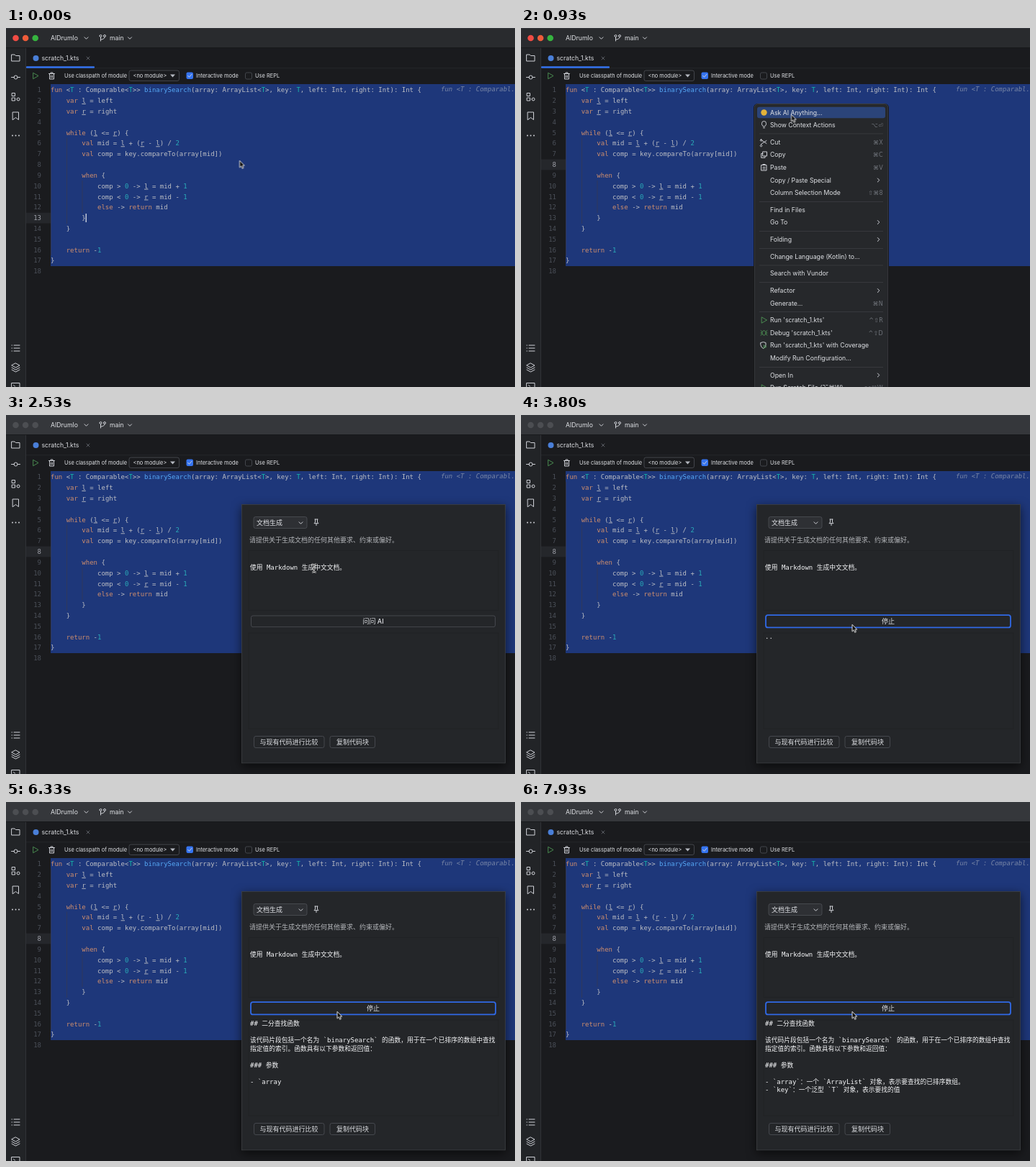
These frames come from a looping animation (707 px wide and 499 px high, 8000 ms). An HTML page:

```html
<!DOCTYPE html>
<html lang="zh-CN">
<head>
<meta charset="utf-8">
<title>Editor assistant</title>
<style>
html, body { margin: 0; width: 100%; height: 100%; overflow: hidden; background: #1a1b1e; }
svg { display: block; width: 100vw; height: 100vh; }
text { white-space: pre; fill: #dfe1e5; font: 8.7px Inter, "Noto Sans CJK SC", "Noto Sans CJK", sans-serif; }
.small { font-size: 7.45px; }
.zh { font: 500 9px Inter, "Noto Sans CJK SC", "Noto Sans CJK", sans-serif; }
.mono { font: 9px "DejaVu Sans Mono", "Noto Sans CJK SC", "Noto Sans CJK", monospace; }
.reply { fill: #f6f7f9; }
.wide { font: 500 8.75px "Noto Sans CJK SC", "Noto Sans CJK", sans-serif; }
.code { fill: #bcbec4; }
.num { fill: #4b5059; text-anchor: end; }
.lit { fill: #a1a3ab; }
.key { fill: #cf8e6d; }
.fn { fill: #56a8f5; }
.type { fill: #16baac; }
.digit { fill: #2aacb8; }
.mut { text-decoration: underline; }
.hint { fill: #7886a6; font-style: italic; }
.short { fill: #6f737a; font: 8px "DejaVu Sans", sans-serif; text-anchor: end; letter-spacing: .3px; }
.mid { text-anchor: middle; }
.label { fill: #b4b6ba; font-weight: 400; }
.icon { fill: none; stroke: #ced0d6; stroke-width: 1; stroke-linecap: round; stroke-linejoin: round; }
.green { stroke: #4f9655; stroke-width: .9; }
.dim { stroke: #6f737a; stroke-width: .8; }
.box { fill: none; stroke: #4e5157; stroke-width: .8; }
.combo { fill: #2e3034; stroke: #4e5157; stroke-width: .8; }
.ring { fill: #242629; stroke: #3069e6; stroke-width: 1.8; }
.pane { fill: none; stroke: #202225; }
.panel { fill: #242629; stroke: #3e4044; stroke-width: .8; filter: drop-shadow(0 4px 7px #0009); }

.before, .menu, .after, .active, .dialog, .pick, .ask, .stop, .draft, .final, .arrow, .beam, .pointer {
  animation: 8s step-end infinite;
}
.before { animation-name: before; }
.menu { animation-name: menu; }
.after { animation-name: after; }
.active { animation-name: active; }
.dialog { animation-name: dialog; }
.pick { animation-name: pick; }
.ask { animation-name: ask; }
.stop { animation-name: stop; }
.draft { animation-name: draft; }
.final { animation-name: final; }
.arrow { animation-name: arrow; }
.beam { animation-name: beam; }
.pointer { animation-name: move; animation-timing-function: ease-in-out; }
@keyframes before { 0% { opacity: 1 } 2.5%, to { opacity: 0 } }
@keyframes menu { 0% { opacity: 0 } 2.5% { opacity: 1 } 11.8%, to { opacity: 0 } }
@keyframes after { 0% { opacity: 0 } 2.5%, to { opacity: 1 } }
@keyframes active { 0% { opacity: 1 } 12%, to { opacity: 0 } }
@keyframes dialog { 0% { opacity: 0 } 12%, to { opacity: 1 } }
@keyframes pick { 0% { opacity: 1 } 24.5%, to { opacity: 0 } }
@keyframes ask { 0% { opacity: 1 } 42%, to { opacity: 0 } }
@keyframes stop { 0% { opacity: 0 } 42%, to { opacity: 1 } }
@keyframes draft { 0% { opacity: 1 } 31%, to { opacity: 0 } }
@keyframes final { 0% { opacity: 0 } 31%, to { opacity: 1 } }
@keyframes arrow { 0% { opacity: 1 } 15.6% { opacity: 0 } 37.5%, to { opacity: 1 } }
@keyframes beam { 0% { opacity: 0 } 15.6% { opacity: 1 } 37.5%, to { opacity: 0 } }
@keyframes move {
  0%, 3% { transform: translate(324.5px, 184.3px) }
  6.2%, 12.5% { transform: translate(375.5px, 120.3px) }
  18%, 22% { transform: translate(426px, 230px) }
  24.2%, 34% { transform: translate(428px, 213px) }
  41%, to { transform: translate(460px, 291.2px) }
}
</style>
</head>
<body>
<svg id="stage" viewBox="0 0 707 499" preserveAspectRatio="none"></svg>
<script>
const stage = document.getElementById('stage');
const LOOP = 8000, ROW = 14.83;

const text = (x, y, content, cls = '') => `<text x="${x}" y="${y}" class="${cls}">${content}</text>`;
const rect = (x, y, w, h, fill, r = 0) => `<rect x="${x}" y="${y}" width="${w}" height="${h}" rx="${r}" fill="${fill}"/>`;
const frame = (x, y, w, h, cls = 'box', r = 2.5) => `<rect x="${x}" y="${y}" width="${w}" height="${h}" rx="${r}" class="${cls}"/>`;
const dot = (x, y, r, fill) => `<circle cx="${x}" cy="${y}" r="${r}" fill="${fill}"/>`;
const icon = (x, y, d, cls = '') => `<path transform="translate(${x} ${y})" d="${d}" class="icon ${cls}"/>`;
const group = (cls, ...parts) => `<g class="${cls}">${parts.join('')}</g>`;
const lights = colors => colors.map((c, i) => dot(13.5 + i * 13.6, 14, 4.3, c)).join('');
const escape = s => s.replace(/&/g, '&amp;').replace(/</g, '&lt;').replace(/>/g, '&gt;');
const mixed = s => escape(s).replace(/[^\x00-\x7f]+/g, run => `<tspan class="wide">${run}</tspan>`);

const DOWN = 'M-2.5-1.2L0 1.3L2.5-1.2', RIGHT = 'M-1.2-2.5L1.3 0L-1.2 2.5';
const PLAY = 'M-3-4L4 0L-3 4Z';

const code = `fun <T : Comparable<T>> binarySearch(array: ArrayList<T>, key: T, left: Int, right: Int): Int {
    var l = left
    var r = right

    while (l <= r) {
        val mid = l + (r - l) / 2
        val comp = key.compareTo(array[mid])

        when {
            comp > 0 -> l = mid + 1
            comp < 0 -> r = mid - 1
            else -> return mid
        }
    }

    return -1
}
`.split('\n');

const tokens = [
  ['key', /^(fun|var|val|while|when|else|return)$/],
  ['fn', /^binarySearch$/], ['type', /^T$/], ['mut', /^[lr]$/], ['digit', /^\d+$/]
];
const highlight = line => escape(line).replace(/\w+/g, word => {
  const hit = tokens.find(([, rule]) => rule.test(word));
  return hit ? `<tspan class="${hit[0]}">${word}</tspan>` : word;
});

const baseline = n => 89.2 + (n - 1) * ROW;
const currentLine = (n, cls) => group(cls,
  rect(28, baseline(n) - 10.5, 34, ROW, '#25272b'), text(49, baseline(n), n, 'mono num lit'));

function chrome() {
  return [
    rect(0, 0, 707, 499, '#1a1b1e'),
    rect(0, 0, 707, 27, '#35373b'), lights(Array(3).fill('#4c4e52')),
    group('active', rect(0, 0, 707, 27, '#292b2e'), lights(['#f04c44', '#ee5c3a', '#36b43f'])),
    rect(0, 0, 707, .8, '#3a3d42'),
    rect(0, 27, 27, 472, '#222427'), rect(27, 27, 1, 472, '#303236'), rect(0, 27, 707, .8, '#17181a'),
    text(62, 17, 'AIDrumlo'), icon(111.5, 14, DOWN),
    icon(134, 14, 'M-2.5-1.5V4M-2.5 2Q3 2 3-1.5M-4-3A1.5 1.5 0 1 0-1-3A1.5 1.5 0 1 0-4-3M1.5-3A1.5 1.5 0 1 0 4.5-3A1.5 1.5 0 1 0 1.5-3'),
    text(144, 17, 'main'), icon(172, 14, DOWN),
    icon(13.5, 41.5, 'M-5.5-4.5H-1.5L0-3H5.5V4.5H-5.5Z'),
    icon(13.5, 68.5, 'M-6 0H-2.5M2.5 0H6M-2.5 0A2.5 2.5 0 1 0 2.5 0A2.5 2.5 0 1 0-2.5 0'),
    icon(13.5, 95.5, 'M-5-5H-1V-1H-5ZM-5 1.5H-1V5.5H-5ZM1.5 3.5A2 2 0 1 0 5.5 3.5A2 2 0 1 0 1.5 3.5'),
    icon(13.5, 122.5, 'M-4-5.5H4V5L0 2L-4 5Z'),
    [-4.5, 0, 4.5].map(dx => dot(13.5 + dx, 149.5, 1, '#ced0d6')).join(''),
    icon(13.5, 445, 'M-2.5-4H5.5M-2.5 0H5.5M-2.5 4H5.5M-5.5-4H-5M-5.5 0H-5M-5.5 4H-5'),
    icon(13.5, 472, 'M0-6L5.5-3L0 0L-5.5-3ZM-5.5 0L0 3L5.5 0M-5.5 3L0 6L5.5 3'),
    icon(13.5, 498, 'M-5.5-4.5H5.5V5H-5.5ZM-3-1.5L-1 0'),
    dot(41.5, 42, 4, '#4a7fd8'), text(49.5, 45.2, 'scratch_1.kts'),
    icon(114, 42, 'M-2-2L2 2M2-2L-2 2', 'dim'),
    rect(28, 55.5, 679, .7, '#2b2d31'),
    group('active', rect(28, 53.3, 95, 2.4, '#3574f0', 1)),
    icon(41, 66.5, PLAY, 'green'),
    icon(63.5, 66.5, 'M-4-3H4M-1.5-3V-4.5H1.5V-3M-3-3V4.5H3V-3M-1-.5V2.5M1-.5V2.5'),
    text(81, 69.2, 'Use classpath of module', 'small'),
    frame(171, 59, 69.5, 14.5), text(176.5, 69.2, '&lt;no module&gt;', 'small'),
    '<path d="M228 64.5h7l-3.5 4z" fill="#b4b8bf"/>',
    rect(250.5, 61.5, 9.5, 9.5, '#3574f0', 2), icon(255.2, 66.3, 'M-2.5 0L-.7 2L2.7-2'),
    text(264, 69.2, 'Interactive mode', 'small'),
    frame(332.5, 62, 9, 9, 'box', 2), text(346, 69.2, 'Use REPL', 'small')
  ].join('');
}

function editor() {
  const numbers = code.map((_, i) => text(49, baseline(i + 1), i + 1, 'mono num')).join('');
  const lines = code.map((line, i) => text(62, baseline(i + 1), highlight(line), 'mono code')).join('');
  return [
    rect(62, 78, 645, 253, '#1e377a'), numbers,
    '<path d="M62.5 93V316M84.5 152.5V272M106 212V257" stroke="#31395a" stroke-width=".9"/>',
    currentLine(13, 'before'), currentLine(8, 'after'),
    lines, text(604, 87.5, escape('fun <T : Comparabl...'), 'mono hint'),
    group('before', rect(110.6, 258, 1.2, 12, '#e8eaee'))
  ].join('');
}

function menu() {
  const items = [
    [117.5, 'Ask AI Anything…'], [135, 'Show Context Actions', '⌥⏎'],
    [158.5, 'Cut', '⌘X'], [176, 'Copy', '⌘C'], [194, 'Paste', '⌘V'],
    [211.5, 'Copy / Paste Special', '>'], [229, 'Column Selection Mode', '⇧⌘8'],
    [252.5, 'Find in Files'], [270, 'Go To', '>'], [294, 'Folding', '>'],
    [317.5, 'Change Language (Kotlin) to…'], [341, 'Search with Vundor'],
    [365, 'Refactor', '>'], [382.5, 'Generate…', '⌘N'],
    [406, "Run 'scratch_1.kts'", '^⇧R'], [423.5, "Debug 'scratch_1.kts'", '^⇧D'],
    [441, "Run 'scratch_1.kts' with Coverage"], [459, 'Modify Run Configuration…'],
    [482.5, 'Open In', '>'], [500, 'Run Scratch File (⌥⌘W)', '⌥⌘W']
  ];
  const rows = items.map(([y, name, extra]) => text(346, y + 3.1, name) +
    (extra === '>' ? icon(496.5, y, RIGHT) : extra ? text(503, y + 3, extra, 'short') : '')).join('');
  const rules = [146.5, 241, 282, 306, 329.5, 353, 394, 471].map(y => rect(331, y, 172, .8, '#3b3d41')).join('');
  return group('menu',
    rect(323, 105, 188, 400, '#111214', 6),
    '<rect x="324.3" y="105.5" width="185.4" height="400" rx="5" fill="#26282b" stroke="#43454a" stroke-width=".8"/>',
    rect(328, 109.7, 178, 15.6, '#2b4479', 3), rules, rows,
    dot(337.5, 117.5, 4.2, '#e3b23a'),
    icon(337.5, 134.5, 'M-1.5 2Q-3.5 0-3-2A3 3 0 0 1 3-2Q3.5 0 1.5 2ZM-1 4.3H1'),
    icon(337.5, 158.5, 'M-4-3L3.5 2M-4 3L3.5-2M-4-3.8A1.3 1.3 0 1 0-3.9-3.8M-4 3.8A1.3 1.3 0 1 0-3.9 3.8'),
    icon(337.5, 176, 'M-1.5-4H4V2H-1.5ZM-1.5-1.5H-3.8V4.3H1.5V2'),
    icon(337.5, 194, 'M-3.5-3.5H3.5V4H-3.5ZM-1.5-4.5H1.5M-1.5-.5H1.5M-1.5 1.8H1.5'),
    icon(337.5, 406, PLAY, 'green'),
    icon(337.5, 423.5, 'M-2.5-1Q0-5 2.5-1V1.5Q0 6 -2.5 1.5ZM-4.5-3L-2.5-1.2M4.5-3L2.5-1.2M-4.5 3.5L-2.5 2M4.5 3.5L2.5 2M-4.5 .4H-2.5M2.5 .4H4.5', 'green'),
    icon(336.5, 441, 'M-3.5-3.5L0-4.5L3.5-3.5V0Q3 3 0 4.5Q-3 3-3.5 0Z'), icon(339, 443, 'M-1.5-2L2 0L-1.5 2Z', 'green'),
    icon(337.5, 500, PLAY, 'green'));
}

function dialog() {
  const prompt = (s, cls) => group(cls, text(339, 215.2, mixed(s), 'mono reply'));
  const output = Array.from({ length: 9 }, (_, i) => text(339, 311.2 + i * 11.53, '', 'mono reply line')).join('');
  return group('dialog',
    frame(327.4, 124.4, 366, 359.4, 'panel', 0),
    frame(337, 188.5, 347, 83, 'pane', 0), frame(337, 303, 347, 133, 'pane', 0),
    frame(344, 141.5, 74, 16, 'combo'), group('pick', frame(343.2, 140.9, 75.4, 17.2, 'ring', 3)),
    text(348, 153, '文档生成', 'zh'), icon(409.5, 150, DOWN),
    icon(431, 149, 'M-2-4H2M-1.5-4V0L-3 1.7H3L1.5 0V-4M0 1.7V4.5'),
    text(338, 177.3, '请提供关于生成文档的任何其他要求、约束或偏好。', 'zh label'),
    prompt('使用 Markdown 生成文档。', 'draft'), prompt('使用 Markdown 生成中文文档。', 'final'),
    group('ask', frame(340.5, 279, 339, 15.6), text(510, 290.2, '问问 AI', 'zh mid')),
    group('stop', frame(340, 278.2, 340, 17.2, 'ring', 3), text(510, 290.2, '停止', 'zh mid')),
    output,
    frame(344.5, 446.5, 97.5, 16), text(393, 457.7, '与现有代码进行比较', 'zh mid'),
    frame(450, 446.5, 62.5, 16), text(481.5, 457.7, '复制代码块', 'zh mid'));
}

const BEAM = 'M-3-5.5Q0-5.5 0-4Q0-5.5 3-5.5M0-4V4M-3 5.5Q0 5.5 0 4Q0 5.5 3 5.5M-1.5 1H1.5';
const pointer = group('pointer',
  '<path class="arrow" d="M0 0V9.6L2.2 7.6L3.7 11L5.4 10.3L3.9 7H6.8Z" fill="#111" stroke="#f2f2f2" stroke-width=".9"/>',
  `<g class="beam" fill="none"><path d="${BEAM}" stroke="#eee" stroke-width="2"/><path d="${BEAM}" stroke="#222" stroke-width=".8"/></g>`);

stage.innerHTML = chrome() + editor() + menu() + dialog() + pointer;

const reply = `## 二分查找函数

该代码片段包括一个名为 \`binarySearch\` 的函数，用于在一个已排序的数组中查找
指定值的索引。函数具有以下参数和返回值：

### 参数

- \`array\`：一个 \`ArrayList\` 对象，表示要查找的已排序数组。
- \`key\`：一个泛型 \`T\` 对象，表示要找的值`;

// Streaming milestones: [time, text shown up to and including this phrase]
const upTo = phrase => reply.indexOf(phrase) + phrase.length;
const pace = [
  [4050, 0], [5070, upTo('，用于')], [5200, upTo('在一个已')],
  [6330, upTo('- `array')], [6930, upTo('表示要')], [7900, reply.length]
];

function streamed(t) {
  if (t < 3400) return '';
  if (t < pace[0][0]) return '.'.repeat(1 + Math.floor((t - 3400) / 250));
  const next = pace.findIndex(([time]) => time > t);
  if (next < 0) return reply;
  const [t0, n0] = pace[next - 1], [t1, n1] = pace[next];
  return reply.slice(0, Math.floor(n0 + (n1 - n0) * (t - t0) / (t1 - t0) + .01));
}

const rows = [...document.querySelectorAll('.line')];
let start, shown = '';
function tick(now) {
  start ??= now;
  const current = streamed((now - start) % LOOP);
  if (current !== shown) {
    const lines = current.split('\n');
    rows.forEach((row, i) => row.innerHTML = mixed(lines[i] || ''));
    shown = current;
  }
  requestAnimationFrame(tick);
}
requestAnimationFrame(tick);
</script>
</body>
</html>
```
